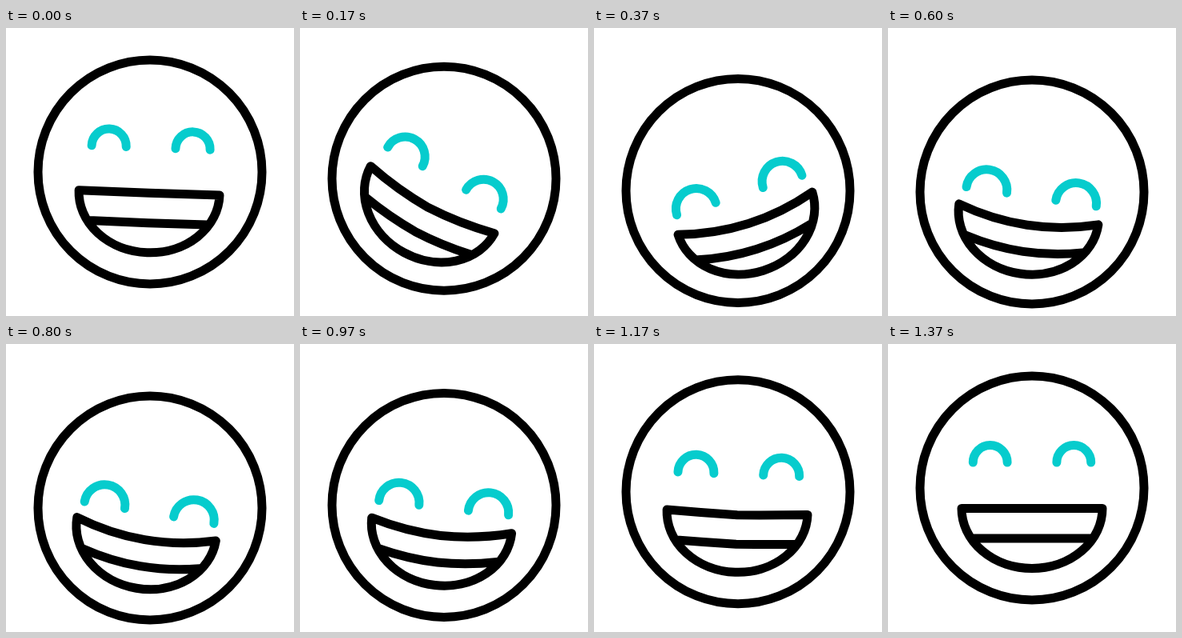
An HTML page for the animation above (1.67 s loop, 360 by 360 pixels).

```html
<!DOCTYPE html>
<html lang="en">
<head>
<meta charset="utf-8">
<title>Laughing face</title>
<style>
  html, body { margin: 0; height: 100%; overflow: hidden; background: #fff; }
  svg { display: block; width: 100vw; height: 100vh; }
</style>
</head>
<body>
<svg viewBox="0 0 360 360" fill="none" stroke="#000" stroke-width="11" stroke-linecap="round" stroke-linejoin="round">
  <g id="face">
    <circle r="140"/>
    <g id="features">
      <path id="eyes" stroke="#06cccd"/>
      <path id="mouth"/>
    </g>
  </g>
</svg>
<script>
const LOOP = 1670, STEP = 100 / 3, LAST_STEP = 41;
const [face, features, eyes, mouth] =
  ['face', 'features', 'eyes', 'mouth'].map(id => document.getElementById(id));

// Smooth 0 to 1 between two times.
function ease(t, start, end) {
  const p = Math.min(1, Math.max(0, (t - start) / (end - start)));
  return p * p * (3 - 2 * p);
}

// Rises to 1, holds, and falls back to 0.
function pulse(t, riseStart, riseEnd, fallStart, fallEnd) {
  return ease(t, riseStart, riseEnd) - ease(t, fallStart, fallEnd);
}

// Damped swing: each peak is a fixed share of the last, on the other side.
function swing(t) {
  const beats = [-33, 167, 367, 650, 1370];
  let angle = 0, from = 0, to = 28.5;
  for (let i = 1; i < beats.length; i++) {
    if (i === beats.length - 1) to = 0;
    angle += (to - from) * ease(t, beats[i - 1], beats[i]);
    from = to;
    to *= -0.617;
  }
  return angle;
}

// A line with a middle vertex that sags and turns smooth as the laugh grows.
function sagLine(halfWidth, y, depth, laugh) {
  const sag = depth * laugh, half = halfWidth / 2;
  const controlY = y + sag * (0.5 + 0.5 * laugh);
  return `M${-halfWidth} ${y}Q${-half} ${controlY} 0 ${y + sag}Q${half} ${controlY} ${halfWidth} ${y}`;
}

function eyeArc(x, y, r) {
  return `M${x - r} ${y}A${r} ${r} 0 0 1 ${x + r} ${y}`;
}

function draw(t) {
  const drop = 25 * pulse(t, 0, 433, 867, 1283);
  const laugh = pulse(t, -33, 240, 905, 1300);
  const lipY = 25.5 + 4.6 * pulse(t, -33, 167, 200, 1100);

  face.setAttribute('transform', `translate(180 ${180 + drop})`);
  features.setAttribute('transform', `rotate(${swing(t)})`);

  const eyeX = 52.3 + 4.2 * laugh, eyeY = -32 + 37.8 * laugh, eyeR = 21.4 + 4.1 * laugh;
  eyes.setAttribute('d', eyeArc(-eyeX, eyeY, eyeR) + eyeArc(eyeX, eyeY, eyeR));

  mouth.setAttribute('d', sagLine(88, lipY, 13.5, laugh) + `A88 75 0 0 1 -88 ${lipY}Z` +
    sagLine(74, lipY + 37.5, 9.5, laugh));
}

function tick() {
  const ms = performance.now() % LOOP;
  draw(Math.min(LAST_STEP, Math.floor((ms + 3.4) / STEP)) * STEP);
  requestAnimationFrame(tick);
}
tick();
</script>
</body>
</html>
```
